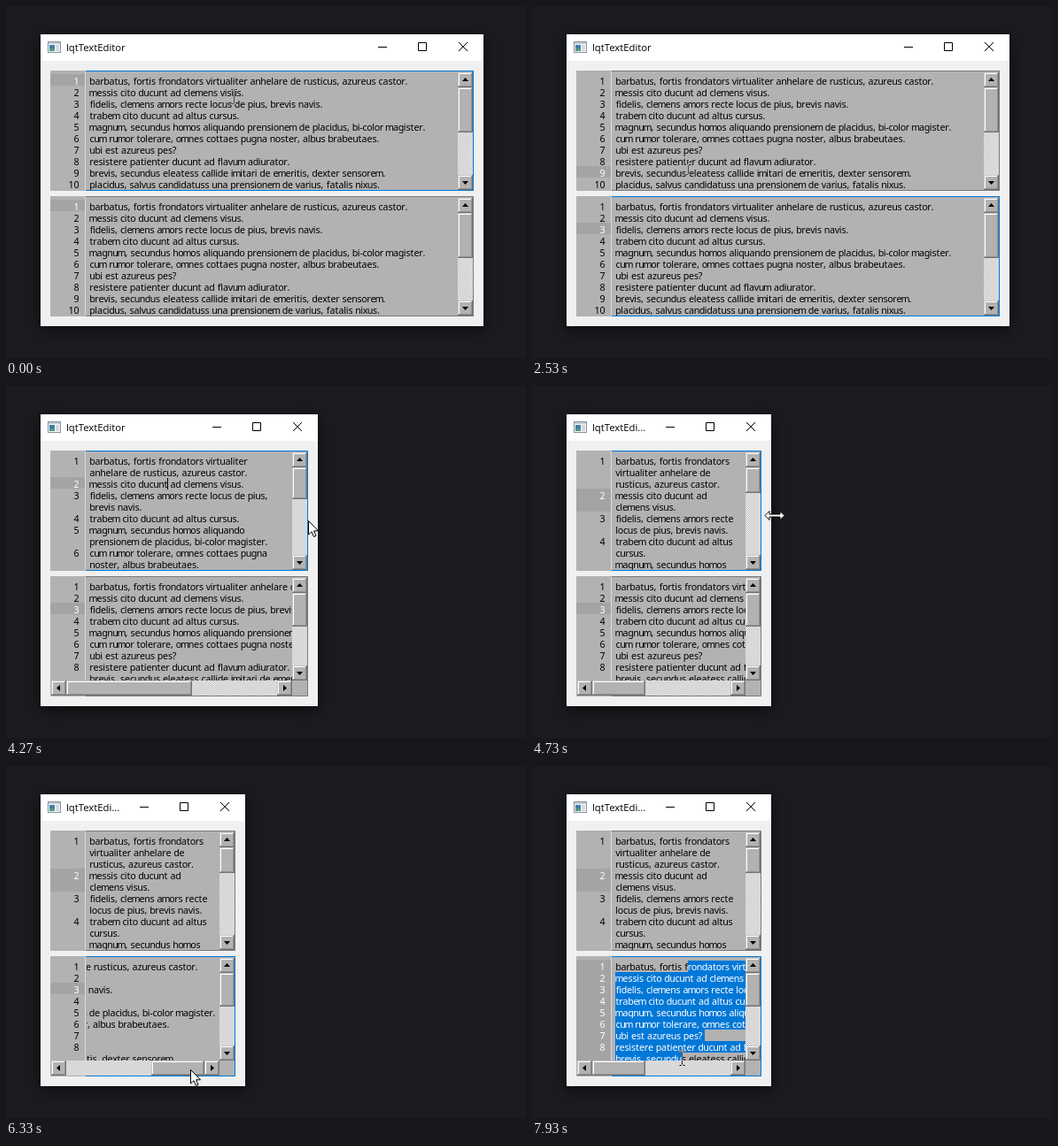
An HTML page with a canvas that plays this animation: 587 by 398 pixels, repeating every 8 s.

```html
<!DOCTYPE html>
<html lang="en">
<head>
<meta charset="utf-8">
<title>lqtTextEditor</title>
<style>
  html, body { margin: 0; width: 100%; height: 100%; overflow: hidden; background: #1b1c20; }
  canvas { display: block; }
</style>
</head>
<body>
<canvas id="stage" width="587" height="398"></canvas>
<script>
const ctx = document.getElementById('stage').getContext('2d');
const LOOP = 8000, STEP = 200 / 3, ROW = 13;
const LEFT = 50, VIEW = 91, TEXT = 94, TOPS = [73, 215], HEIGHT = 136, BUTTON = 17;
const WIDE = 528, SLIM = 259;
const BACK = '#1b1c20', GREY = '#b2b2b2', BLUE = '#0078d7';
const FAMILY = '"Noto Sans", "Open Sans", sans-serif';
const LINES = [
  'barbatus, fortis frondators virtualiter anhelare de rusticus, azureus castor.',
  'messis cito ducunt ad clemens visus.',
  'fidelis, clemens amors recte locus de pius, brevis navis.',
  'trabem cito ducunt ad altus cursus.',
  'magnum, secundus homos aliquando prensionem de placidus, bi-color magister.',
  'cum rumor tolerare, omnes cottaes pugna noster, albus brabeutaes.',
  'ubi est azureus pes?',
  'resistere patienter ducunt ad flavum adiurator.',
  'brevis, secundus eleatess callide imitari de emeritis, dexter sensorem.',
  'placidus, salvus candidatuss una prensionem de varius, fatalis nixus.'
];

// Pointer moves: from, until, then where it comes to rest
const START = { x: 257, y: 102 };
const RESIZE = { from: 3800, until: 4733, x: 274, y: 146, power: 2 };
const SCROLL = { from: 5650, until: 6333, x: 208, y: 343 };
const SCROLL_BACK = { from: 6470, until: 6850, x: 53, y: 342 };
const MOVES = [
  { from: 70, until: 130, x: 246, y: 108 },
  { from: 530, until: 667, x: 157, y: 114 },
  { from: 1010, until: 1867, x: 157, y: 252 },
  { from: 2000, until: 2533, x: 176, y: 182 },
  { from: 2533, until: 2867, x: 183, y: 100 },
  { from: 2933, until: 3400, x: 543, y: 171 },
  RESIZE,
  { from: 4810, until: 5400, x: 95, y: 339 },
  SCROLL,
  SCROLL_BACK,
  { from: 6950, until: 7533, x: 177, y: 226 },
  { from: 7667, until: 7933, x: 169, y: 330 }
];
const SELECT_AT = 7660;
const CLICKS = [860, 1460, 1920, 2730, 2930, 5660, SELECT_AT];

const clamp = (v, lo, hi) => Math.max(lo, Math.min(hi, v));
const easeOut = (p, power) => 1 - (1 - p) ** power;
const progress = (move, t) => clamp((t - move.from) / (move.until - move.from), 0, 1);
const scrolling = t => t > SCROLL.from && t < SCROLL_BACK.until + STEP;

function pointerAt(t) {
  let { x, y } = START;
  for (const move of MOVES) {
    const p = easeOut(progress(move, t), move.power || 1);
    x += (move.x - x) * p;
    y += (move.y - y) * p;
  }
  return { x: Math.round(x), y: Math.round(y) };
}

const edgeAt = t => Math.round(WIDE + (SLIM - WIDE) * easeOut(progress(RESIZE, t), 1.72));

// Letters advance by whole pixels, as in a small screen font; thin stems take 2.5.
const advances = {};
function advance(ch) {
  if (!(ch in advances)) {
    ctx.font = `102px ${FAMILY}`;
    const natural = ctx.measureText(ch).width / 10;
    advances[ch] = 'il'.includes(ch) ? 2.5 : Math.min(8, Math.round(natural));
  }
  return advances[ch];
}
const widthOf = text => [...text].reduce((w, ch) => w + advance(ch), 0);
const CONTENT = Math.max(...LINES.map(widthOf)) + 8;

function columnAt(text, x) {
  let col = 0, edge = TEXT;
  while (col < text.length && edge + advance(text[col]) / 2 < x) edge += advance(text[col++]);
  return col;
}

function wrapLine(text, width) {
  const rows = [];
  for (const word of text.split(' ')) {
    const joined = rows.length ? `${rows[rows.length - 1]} ${word}` : word;
    if (rows.length && widthOf(joined) <= width) rows.pop();
    rows.push(rows.length && widthOf(joined) > width ? word : joined.trim());
  }
  return rows;
}

function layOut(text, width) {
  let row = '';
  const rows = [];
  for (const word of text.split(' ')) {
    const joined = row ? `${row} ${word}` : word;
    if (row && widthOf(joined) > width) {
      rows.push(row);
      row = word;
    } else row = joined;
  }
  return [...rows, row];
}

function rect(x, y, w, h, color) {
  ctx.fillStyle = color;
  ctx.fillRect(x, y, w, h);
}

function clipped(x, y, w, h, draw) {
  ctx.save();
  ctx.beginPath();
  ctx.rect(x, y, w, h);
  ctx.clip();
  draw();
  ctx.restore();
}

function drawText(text, x, y, colorAt) {
  [...text].forEach((ch, i) => {
    const w = advance(ch);
    ctx.font = `10.7px ${FAMILY}`;
    ctx.fillStyle = colorAt(i);
    ctx.fillText(ch, x + (w - ctx.measureText(ch).width) / 2, y);
    x += w;
  });
}

const checker = (() => {
  const tile = document.createElement('canvas');
  tile.width = tile.height = 2;
  const c = tile.getContext('2d');
  c.fillStyle = '#fff';
  c.fillRect(0, 0, 2, 2);
  c.fillStyle = GREY;
  c.fillRect(0, 0, 1, 1);
  c.fillRect(1, 1, 1, 1);
  return ctx.createPattern(tile, 'repeat');
})();

function raised(x, y, w, h) {
  rect(x, y, w, h, '#747474');
  rect(x, y, w - 1, h - 1, '#c6c6c6');
  rect(x + 1, y + 1, w - 2, h - 2, '#909090');
  rect(x + 1, y + 1, w - 3, h - 3, '#fff');
  rect(x + 2, y + 2, w - 4, h - 4, GREY);
}

function arrowButton(x, y, turns) {
  raised(x, y, BUTTON, BUTTON);
  ctx.save();
  ctx.translate(x + BUTTON / 2, y + BUTTON / 2);
  ctx.rotate(turns * Math.PI / 2);
  ctx.fillStyle = '#000';
  ctx.fill(new Path2D('M-3.5 1.5L0-2.5 3.5 1.5z'));
  ctx.restore();
}

function verticalBar(x, top, bottom, thumb) {
  rect(x, top, BUTTON, bottom - top, checker);
  arrowButton(x, top, 0);
  arrowButton(x, bottom - BUTTON, 2);
  raised(x, top + BUTTON, BUTTON, thumb);
}

function horizontalBar(y, right, offset, thumb) {
  const left = LEFT + 1;
  rect(left, y, right - left, BUTTON, checker);
  arrowButton(left, y, 3);
  arrowButton(right - BUTTON, y, 1);
  raised(left + BUTTON + offset, y, thumb, BUTTON);
}

function drawEditor({ top, right, wrap, focused, line, caret, drag, selection }) {
  const barX = right - BUTTON - 1, viewWidth = barX - VIEW;
  const hasBar = !wrap && viewWidth < CONTENT;
  const bottom = top + HEIGHT - 1 - (hasBar ? BUTTON : 0);
  const trackLen = barX - LEFT - 1 - 2 * BUTTON;
  const thumb = Math.floor(trackLen * viewWidth / CONTENT);
  const offset = hasBar ? clamp(drag, 0, trackLen - thumb) : 0;
  const scroll = offset && Math.round(offset / (trackLen - thumb) * (CONTENT - viewWidth));

  rect(LEFT, top, right - LEFT, HEIGHT, GREY);
  let y = top + 5;
  LINES.forEach((text, n) => {
    const rows = wrap ? layOut(text, viewWidth - 10) : [text];
    const first = y, height = rows.length * ROW;
    const selected = selection && n <= selection.line;
    const active = selected || n === line;
    const from = selected && n === 0 ? selection.start : 0;
    const to = !selected ? 0 : n === selection.line ? selection.col : text.length + 1;

    clipped(LEFT, top, 39, bottom - top, () => {
      if (active) rect(LEFT, first - 1, 39, height, '#a4a4a4');
      if (first + height > bottom) return;
      const label = String(n + 1);
      drawText(label, 82.5 - widthOf(label), first + 11, () => active ? '#fff' : '#000');
    });
    clipped(VIEW, top + 1, viewWidth, bottom - top - 1, () => {
      if (to > from) {
        const x0 = Math.round(TEXT + widthOf(text.slice(0, from)));
        const x1 = Math.round(TEXT + widthOf(text.slice(0, to) + (to > text.length ? ' ' : '')));
        rect(x0 - scroll, first, x1 - x0, ROW, BLUE);
      }
      rows.forEach((row, i) => drawText(row, TEXT + 0.5 - scroll, first + i * ROW + 11,
        c => c >= from && c < to ? '#fff' : '#000'));
      if (caret && n === line) rect(caret - scroll, first, 1, ROW, '#000');
    });
    y += height;
  });

  rect(VIEW - 2, top + 1, 1, bottom - top - 1, '#dcdcdc');
  const rim = focused ? BLUE : '#7a7a7a';
  rect(VIEW - 1, top, right - VIEW + 1, 1, rim);
  rect(VIEW - 1, top + HEIGHT - 1, right - VIEW + 1, 1, rim);
  rect(right - 1, top, 1, HEIGHT, rim);
  // Wrapping lengthens the text, so a slimmer window gives a shorter thumb.
  const wrappedThumb = Math.round(29 + 22 * (right - SLIM) / (WIDE - SLIM));
  verticalBar(barX, top + 2, bottom, wrap ? wrappedThumb : hasBar ? 38 : 51);
  if (hasBar) {
    horizontalBar(bottom, barX, offset, thumb);
    rect(barX, bottom, BUTTON, BUTTON, GREY);
  }
}

function drawWindow(right) {
  ctx.save();
  ctx.shadowColor = 'rgba(0,0,0,.6)';
  ctx.shadowBlur = 16;
  ctx.shadowOffsetY = 4;
  rect(39, 32, right - 39, 330, '#f0f0f0');
  ctx.restore();
  rect(39, 32, right - 39, 30, '#fff');

  // Small window icon
  rect(47, 40, 15, 13, '#8a9199');
  rect(48, 41, 13, 11, '#f4f6f8');
  rect(48, 41, 13, 2, '#c3ccd4');
  rect(49, 44, 6, 7, '#3f7fa6');
  rect(49, 48, 6, 3, '#4f9a83');
  rect(56, 44, 4, 7, '#d5dade');

  ctx.font = '11.3px "Open Sans", "Noto Sans", sans-serif';
  ctx.fillStyle = '#000';
  ctx.fillText(right < 272 ? 'lqtTextEdi...' : 'lqtTextEditor', 68, 51);

  ctx.save();
  ctx.translate(right, 46);
  ctx.strokeStyle = '#000';
  ctx.lineWidth = 1;
  ctx.stroke(new Path2D('M-119 .5h10M-73.5-4.5h9v9h-9zM-28-5l10 10M-18-5l-10 10'));
  ctx.restore();
}

function drawBeam(x, y) {
  ctx.save();
  ctx.globalCompositeOperation = 'difference';
  rect(x, y - 7, 1, 15, '#fff');
  for (const end of [y - 8, y + 8]) {
    rect(x - 3, end, 3, 1, '#fff');
    rect(x + 1, end, 3, 1, '#fff');
  }
  ctx.restore();
}

const ARROW = new Path2D('M.5.5V16L4 12.8l2.5 5.7L9 17.4 6.6 11.8h4.9z');
const DOUBLE_ARROW = new Path2D('M-11 0l5-5v3.5h12v-3.5l5 5-5 5v-3.5h-12v3.5z');

function drawShape(path, x, y) {
  ctx.save();
  ctx.translate(x, y);
  ctx.fillStyle = '#fff';
  ctx.strokeStyle = '#000';
  ctx.lineWidth = 1;
  ctx.fill(path);
  ctx.stroke(path);
  ctx.restore();
}

const hasBarAt = right => right - BUTTON - 1 - VIEW < CONTENT;

// Index of the editor whose text lies under the point, or -1
function textUnder({ x, y }, right) {
  if (x < VIEW || x > right - BUTTON - 1) return -1;
  return TOPS.findIndex((top, i) =>
    y > top && y < top + HEIGHT - 1 - (i && hasBarAt(right) ? BUTTON : 0));
}

const lineAt = (y, top) => clamp(Math.floor((y - top - 5) / ROW), 0, LINES.length - 1);

function drawPointer(point, right, t) {
  const { x, y } = point;
  if (textUnder(point, right) >= 0 && !scrolling(t)) drawBeam(x, y);
  else if (t < RESIZE.until + 2 * STEP && x > right) drawShape(DOUBLE_ARROW, x, y + 0.5);
  else drawShape(ARROW, x, y);
}

function stateAt(t) {
  const marks = TOPS.map(() => ({ line: 0, x: TEXT }));
  let focus = 0;
  for (const click of CLICKS.filter(c => c <= t)) {
    const point = pointerAt(click);
    focus = point.y < TOPS[1] ? 0 : 1;
    if (textUnder(point, edgeAt(click)) < 0) continue;
    const line = lineAt(point.y, TOPS[focus]);
    const before = LINES[line].slice(0, columnAt(LINES[line], point.x));
    marks[focus] = { line, x: Math.round(TEXT + widthOf(before)) };
  }
  return { focus, marks };
}

function render(time) {
  const t = Math.floor((time + 5) / STEP) * STEP;
  const point = pointerAt(t), right = edgeAt(t);
  const { focus, marks } = stateAt(t);
  const selecting = t >= SELECT_AT;
  const caretOn = t > 600 && !selecting && (t + 210) % 1000 < 500;

  let selection = null;
  if (selecting) {
    const line = lineAt(point.y, TOPS[1]);
    selection = {
      start: columnAt(LINES[0], pointerAt(SELECT_AT).x),
      line,
      col: columnAt(LINES[line], point.x)
    };
  }

  rect(0, 0, 587, 398, BACK);
  drawWindow(right + 11);
  TOPS.forEach((top, i) => drawEditor({
    top, right,
    wrap: i === 0,
    focused: focus === i,
    line: marks[i].line,
    caret: focus === i && caretOn ? marks[i].x : 0,
    drag: scrolling(t) ? point.x - 96 : 0,
    selection: i === 1 ? selection : null
  }));
  drawPointer(point, right, t);
}

function frame() {
  render(performance.now() % LOOP);
  requestAnimationFrame(frame);
}
frame();
</script>
</body>
</html>
```
